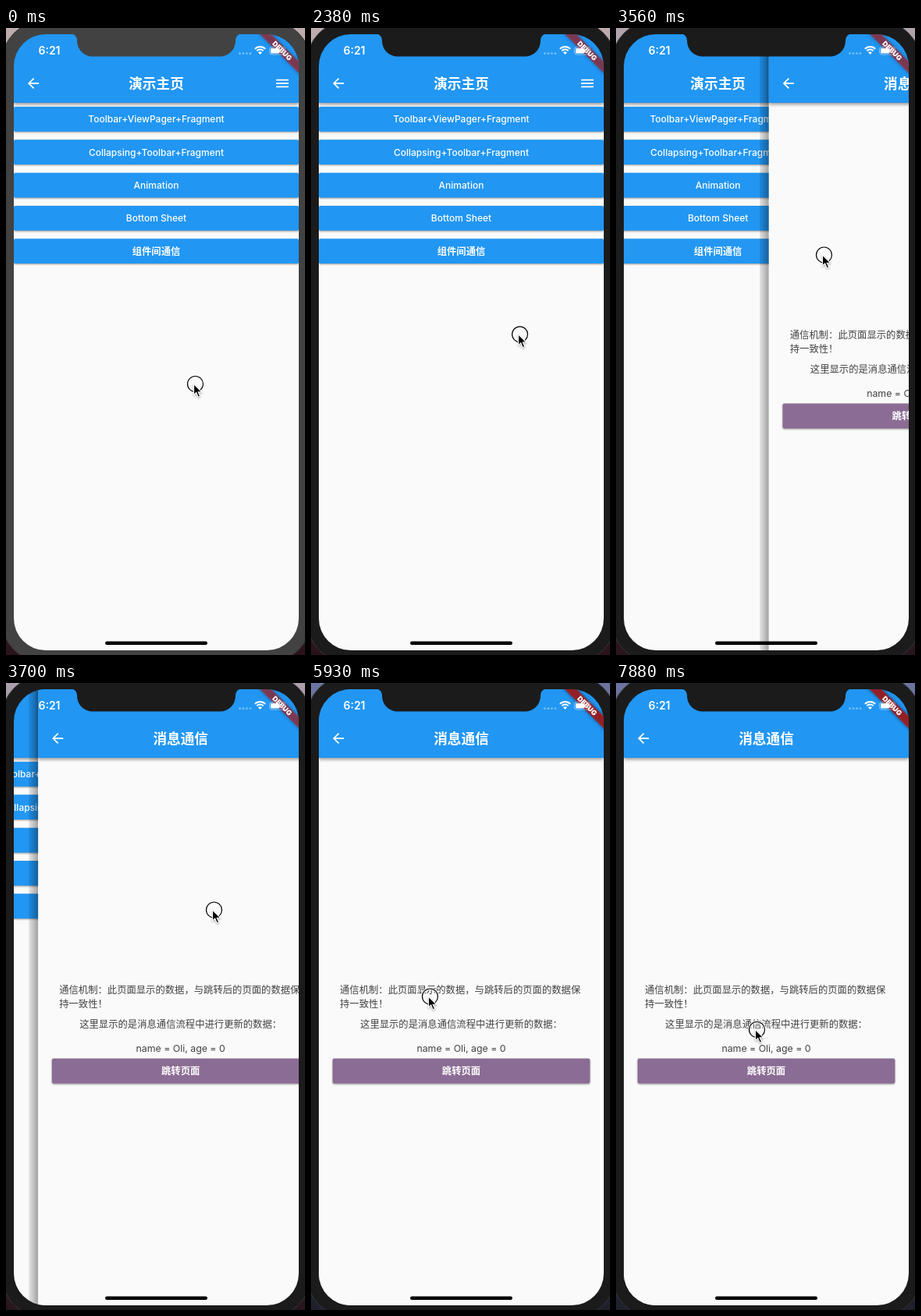
An HTML page that plays this animation: 383x804 px, repeating every 8 s.

```html
<!DOCTYPE html>
<html lang="zh-CN">
<head>
<meta charset="utf-8">
<title>演示主页</title>
<style>
  html, body { margin: 0; width: 100%; height: 100%; overflow: hidden; background: #1b1b1b; }
  svg { display: block; width: 383px; height: 804px; }
  text { font-family: Inter, "Noto Sans CJK SC", "Noto Sans CJK", sans-serif; fill: #fff; }
  .mid { text-anchor: middle; }
  .title { font-size: 17.65px; font-weight: 600; }
  .label { font-size: 12px; font-weight: 500; }
  .cjk { font-size: 12.34px; font-weight: 700; }
  .body { font-size: 12.34px; fill: #000; fill-opacity: .74; }
  .bar { fill: #2196f3; filter: drop-shadow(0 2px 2px rgba(0,0,0,.4)); }
  .btn { filter: drop-shadow(0 1.4px 1.1px rgba(0,0,0,.4)); }
  .btn.up { filter: drop-shadow(0 3.5px 4px rgba(0,0,0,.45)); }
</style>
</head>
<body>
<svg viewBox="0 0 383 804">
  <defs>
    <clipPath id="screenClip"><rect x="10" y="8" width="365" height="790" rx="41"/></clipPath>
    <clipPath id="tapClip"><rect x="10" y="270.3" width="365" height="31.8" rx="1.8"/></clipPath>
    <linearGradient id="edge">
      <stop offset="0" stop-opacity=".08"/>
      <stop offset="1" stop-opacity=".36"/>
    </linearGradient>
    <linearGradient id="wall" x2="0" y2="1">
      <stop id="wallTop" offset="0"/>
      <stop id="wallLow" offset="1"/>
    </linearGradient>
    <path id="back" d="M20 11H7.83l5.59-5.59L12 4l-8 8 8 8 1.41-1.41L7.83 13H20z"/>
    <path id="menu" d="M3 18h18v-2H3zm0-5h18v-2H3zm0-7v2h18V6z"/>
    <g id="banner" transform="translate(353.8 29.2) rotate(45)">
      <rect x="-42" y="-5.3" width="84" height="10.6" fill="#b71c1c" fill-opacity=".63"
            style="filter:drop-shadow(0 0 2px rgba(0,0,0,.5))"/>
      <text class="mid" y="3.2" font-size="8.9" font-weight="900">DEBUG</text>
    </g>
  </defs>

  <rect width="383" height="804" fill="url(#wall)"/>
  <rect id="bezel" x="-6" y="-10" width="397" height="824" rx="56" stroke="#363636"/>

  <g clip-path="url(#screenClip)">
    <g id="home"></g>
    <g id="detail"></g>
    <use href="#banner"/>
  </g>

  <path id="notch" d="M83 7.5a8 8 0 0 1 8 8v1a20 20 0 0 0 20 20h163a20 20 0 0 0 20-20v-1a8 8 0 0 1 8-8z"/>
  <text class="mid" x="55.5" y="34.4" font-size="14" font-weight="600">6:21</text>
  <g id="status" fill="#fff"></g>
  <rect x="127" y="786.5" width="131" height="4.6" rx="2.3"/>

  <g id="cursor">
    <circle r="10" fill="none" stroke="#fff" stroke-width="3"/>
    <circle r="10" fill="none" stroke="#000" stroke-width="1.2"/>
    <path d="M-2 0v14l3.2-3 2.5 5.8 2.5-1.1-2.5-5.5h4.5z" stroke="#fff" stroke-width="1.1"
          style="filter:drop-shadow(0 1px 1px rgba(0,0,0,.35))"/>
  </g>
</svg>

<script>
const LOOP = 8000, WIDTH = 365, UNIT = 0.8816;
const TICK = 148.5;
const TAP = 3100, PUSH = 3465;    // button pressed, page starts to slide in
const $ = id => document.getElementById(id);
const ramp = (t, from, to) => Math.min(1, Math.max(0, (t - from) / (to - from)));
const lerp = (a, b, k) => a + (b - a) * k;
const mix = (a, b, k) => `rgb(${a.map((v, i) => Math.round(lerp(v, b[i], k)))})`;

const icon = (name, x) =>
  `<use href="#${name}" fill="#fff" transform="translate(${x} 71) scale(${UNIT}) translate(-12 -12)"/>`;
const text = (cls, y, str, x = 192.5) => `<text class="${cls}" x="${x}" y="${y}">${str}</text>`;
const page = title =>
  `<rect x="10" y="8" width="${WIDTH}" height="790" fill="#fafafa"/>
   <rect class="bar" x="10" y="0" width="${WIDTH}" height="96"/>
   ${icon("back", 35)}${text("mid title", 77.5, title)}`;
const button = (x, y, w, fill, id) =>
  `<rect class="btn" id="${id}" x="${x}" y="${y}" width="${w}" height="31.8" rx="1.8" fill="${fill}"/>`;

const ink = `<g id="ink" clip-path="url(#tapClip)" fill="#fff">
  <rect x="10" y="270" width="${WIDTH}" height="33" opacity=".07"/>
  <circle id="ripple" cx="266.5" cy="291" opacity=".1"/></g>`;
const items = ["Toolbar+ViewPager+Fragment", "Collapsing+Toolbar+Fragment", "Animation", "Bottom Sheet"];
const row = i => 101 + i * 48 * UNIT;

$("home").innerHTML = page("演示主页") + icon("menu", 354) +
  items.map((name, i) =>
    button(10, row(i), WIDTH, "#2196f3", "item" + i) + text("mid label", row(i) + 20.2, name)).join("") +
  button(10, row(4), WIDTH, "#2196f3", "target") + ink + text("mid cjk", row(4) + 20.5, "组件间通信");

$("detail").innerHTML =
  `<rect x="-2" y="8" width="12" height="790" fill="url(#edge)"/>` + page("消息通信") +
  text("body", 397.7, "通信机制：此页面显示的数据，与跳转后的页面的数据保", 37) +
  text("body", 415.6, "持一致性！", 37) +
  text("body mid", 441.8, "这里显示的是消息通信流程中进行更新的数据：") +
  text("body mid", 472.6, "name = Oli, age = 0") +
  button(27.7, 481.6, 329.6, "#8b6c94", "jump") +
  text("mid cjk", 502, "跳转页面") + `<use href="#banner"/>`;

const arc = r => {
  const d = r * 0.72;
  return `<path d="M${325.5 - d} ${33.5 - d}A${r} ${r} 0 0 1 ${325.5 + d} ${33.5 - d}"
    fill="none" stroke="#fff" stroke-width="2"/>`;
};
$("status").innerHTML =
  [0, 1, 2, 3].map(i => `<circle cx="${299.5 + i * 4.5}" cy="32.7" r="1.4" opacity=".4"/>`).join("") +
  arc(9.2) + arc(5.8) + `<path d="M325.5 34l-2.5-2.7q2.5-2 5 0z"/>
  <rect x="337.5" y="24.5" width="20" height="9.6" rx="2.8" fill="none" stroke="#fff" stroke-opacity=".45"/>
  <rect x="339" y="26" width="11.5" height="6.6" rx="1.3"/>`;

// Pointer moves: start, end, where it arrives; it rests in between.
const moves = [
  [1225, 1485, 269, 525], [1800, 2820, 266.5, 291], [3860, 4170, 151, 531], [4170, 4590, 149.5, 533],
  [4640, 5346, 55, 400], [5346, 5940, 152.5, 402], [5940, 6237, 217, 405],
  [6390, 7128, 340, 400], [7128, 7425, 42, 408], [7425, 7870, 180.5, 444.5]
];
const pointer = t => moves.reduce(([x, y], [from, to, x2, y2]) => {
  const k = ramp(t, from, to);
  return [lerp(x, x2, k), lerp(y, y2, k)];
}, [242.5, 456.5]);

// Page change: the new page slides over, the old one drifts a third as far.
const slide = (id, from, to) => {
  const move = $(id).animate(
    [{ transform: `translateX(${from}px)` }, { transform: `translateX(${to}px)` }],
    { delay: PUSH, duration: 500, easing: "cubic-bezier(.35,.91,.33,.97)", fill: "both" });
  move.pause();
  return move;
};
const slides = [slide("detail", WIDTH + 13, 0), slide("home", 0, -WIDTH / 3)];

function draw(now) {
  const t = Math.floor((now % LOOP + 14) / TICK) * TICK;
  const [x, y] = pointer(t), wall = ramp(t, 3200, 5400);

  slides.forEach(move => move.currentTime = t);
  $("cursor").setAttribute("transform", `translate(${x} ${y})`);
  $("ripple").setAttribute("r", 26 + Math.max(0, t - TAP - 18) * 0.5);
  $("ink").setAttribute("opacity", t < TAP ? 0 : 1 - ramp(t, 3270, 3600));
  $("target").classList.toggle("up", t >= TAP && t < PUSH);

  const shell = t < 130 ? "#424242" : "#1b1b1b";
  $("bezel").setAttribute("fill", shell);
  $("notch").setAttribute("fill", shell);
  $("wallTop").setAttribute("stop-color", mix([190, 172, 174], [108, 116, 160], wall));
  $("wallLow").setAttribute("stop-color", mix([42, 18, 26], [30, 32, 44], wall));
}

function tick() {
  draw(performance.now());
  requestAnimationFrame(tick);
}
tick();
</script>
</body>
</html>
```
